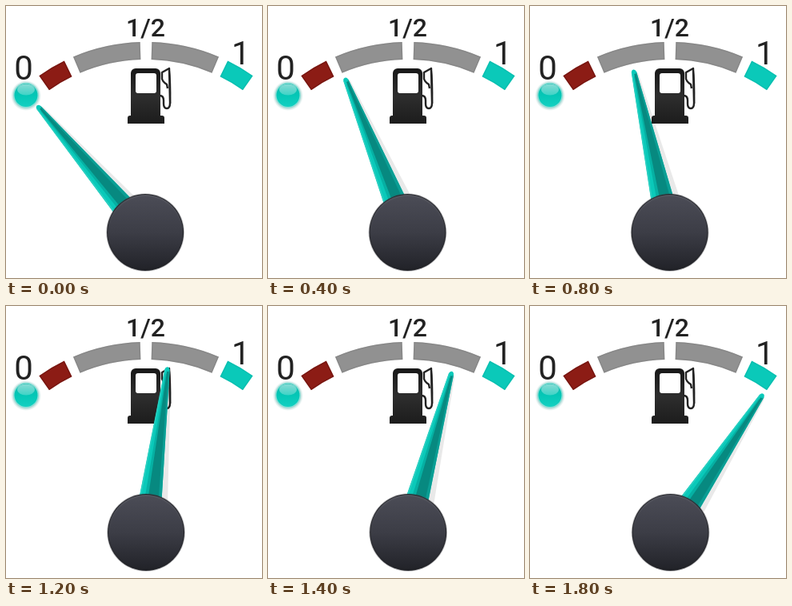
Recreate the animation shown at these times as an HTML page with a canvas. Size 320 by 340 pixels, loop 2 s.

```html
<!DOCTYPE html>
<html lang="en">
<head>
<meta charset="utf-8">
<title>Fuel gauge</title>
<style>
html, body { margin: 0; width: 100%; height: 100%; overflow: hidden; background: #fff; }
canvas { display: block; }
</style>
</head>
<body>
<canvas id="stage" width="320" height="340"></canvas>
<script>
const ctx = document.getElementById('stage').getContext('2d');
const STEP = 200;
// Needle angle in degrees from vertical, one per step.
const ANGLES = [-40.5, -30, -22.1, -22.1, -12.6, -2.5, 7.4, 15.2, 22.6, 33.8];
const TEAL = '#0ac9b9';
const rad = deg => deg * Math.PI / 180;

function linear(x0, y0, x1, y1, ...colors) {
  const g = ctx.createLinearGradient(x0, y0, x1, y1);
  colors.forEach((c, i) => g.addColorStop(i / (colors.length - 1), c));
  return g;
}

function poly(fill, ...pts) {
  ctx.beginPath();
  pts.forEach(([x, y]) => ctx.lineTo(x, y));
  ctx.closePath();
  ctx.fillStyle = fill;
  ctx.fill();
}

function disc(x, y, r, fill) {
  ctx.beginPath();
  ctx.arc(x, y, r, 0, Math.PI * 2);
  ctx.fillStyle = fill;
  ctx.fill();
}

function box(x, y, w, h, r, fill) {
  ctx.beginPath();
  ctx.roundRect(x, y, w, h, r);
  ctx.fillStyle = fill;
  ctx.fill();
}

function segment(from, to, color, edge) {
  const a = rad(from - 90), b = rad(to - 90);
  ctx.beginPath();
  ctx.arc(175, 278, 233, a, b);
  ctx.arc(175, 278, 211, b, a, true);
  ctx.closePath();
  ctx.fillStyle = color;
  ctx.fill();
  ctx.save();
  ctx.clip();
  ctx.strokeStyle = edge;
  ctx.lineWidth = 3;
  ctx.stroke();
  ctx.restore();
}

function label(text, x, y, size, weight) {
  ctx.font = `${weight} ${size}px Roboto, Arial, sans-serif`;
  ctx.textAlign = 'center';
  ctx.fillStyle = '#222';
  ctx.fillText(text, x, y);
}

function lamp() {
  const glow = ctx.createRadialGradient(25, 112, 14, 25, 112, 19);
  glow.addColorStop(0, 'rgba(70,150,145,.6)');
  glow.addColorStop(1, 'rgba(120,190,185,0)');
  disc(25, 112, 19, glow);
  disc(25, 111.5, 16, '#8edfd7');
  disc(25, 111.5, 14.5, linear(0, 97, 0, 126, '#12b9ac', '#05c7b6', '#14d0c1'));
  ctx.beginPath();
  ctx.ellipse(25, 104.5, 11, 7, 0, 0, Math.PI * 2);
  ctx.fillStyle = linear(0, 97, 0, 112, 'rgba(255,255,255,.5)', 'rgba(255,255,255,.22)');
  ctx.fill();
}

function pump() {
  const dark = linear(0, 78, 0, 147, '#181818', '#2e2e2e', '#1c1c1c');
  box(156, 78, 37, 64, [6, 6, 0, 0], dark);
  box(152, 137, 46, 10, [3, 3, 0, 0], dark);
  box(162, 84, 26, 25, 3, '#fff');
  ctx.strokeStyle = '#222';
  ctx.lineWidth = 2.4;
  ctx.lineJoin = 'round';
  ctx.stroke(new Path2D('M192 112 Q197 112 197 118 L197 122 Q197 128 201 128 Q205 128 205 121 L204 78 L195 83 L195 91 Q196 95 201 98 L202 103'));
  ctx.lineWidth = 1.6;
  ctx.stroke(new Path2D('M204 78 Q206 94 205.5 122'));
}

function face() {
  ctx.fillStyle = '#fff';
  ctx.fillRect(0, 0, 320, 340);
  segment(-35, -26, '#8c1c15', 'rgba(60,0,0,.25)');
  segment(-23, -1.8, '#919191', 'rgba(110,110,110,.25)');
  segment(1.8, 23, '#919191', 'rgba(110,110,110,.25)');
  segment(26, 35, TEAL, 'rgba(0,150,140,.2)');
  label('0', 22, 92, 42, 400);
  label('1/2', 174.5, 38, 32, 500);
  label('1', 293.5, 73, 41, 400);
  lamp();
  pump();
}

function needle(x, y, deg) {
  const blade = new Path2D('M-14 -44 L-3.2 -205 Q-2.5 -208.5 0 -208.5 Q2.5 -208.5 3.2 -205 L14 -44 Z');
  ctx.save();
  ctx.translate(x, y);
  ctx.rotate(rad(deg));
  const c = Math.cos(rad(deg)), s = Math.sin(rad(deg));
  poly('rgba(0,0,0,.085)', [-10, -44], [0, -204], [4 + c, -203],
    [13 + 9 * c, -40 - 9 * s]);
  ctx.fillStyle = TEAL;
  ctx.fill(blade);
  ctx.clip(blade);
  poly('#06b0a3', [-7, -44], [-1, -200], [2, -200], [2, -44]);
  poly('#078980', [-3, -44], [0, -203], [2.3, -203], [11, -44]);
  poly('#0a9e94', [10, -44], [2, -203], [5, -208], [16, -44]);
  poly('#2bd0c2', [-14, -44], [-3.2, -205], [-2, -205], [-12, -44]);
  ctx.restore();
}

function knob(x, y) {
  disc(x, y, 48.8, 'rgba(70,70,75,.35)');
  disc(x, y, 48, '#25262b');
  disc(x, y, 47, linear(0, y - 47, 0, y + 47, '#55565f', '#3b3c44', '#202126'));
  disc(x, y, 45.3, linear(0, y - 46, 0, y + 46, '#4b4c56', '#3c3d46', '#222329'));
}

function draw(now) {
  const deg = ANGLES[Math.floor(now / STEP) % ANGLES.length];
  const x = 174.9 + deg * 0.02;
  face();
  needle(x, 283, deg);
  knob(x, 283);
}

const start = performance.now();
function tick() {
  draw(performance.now() - start);
  requestAnimationFrame(tick);
}
tick();
</script>
</body>
</html>
```
